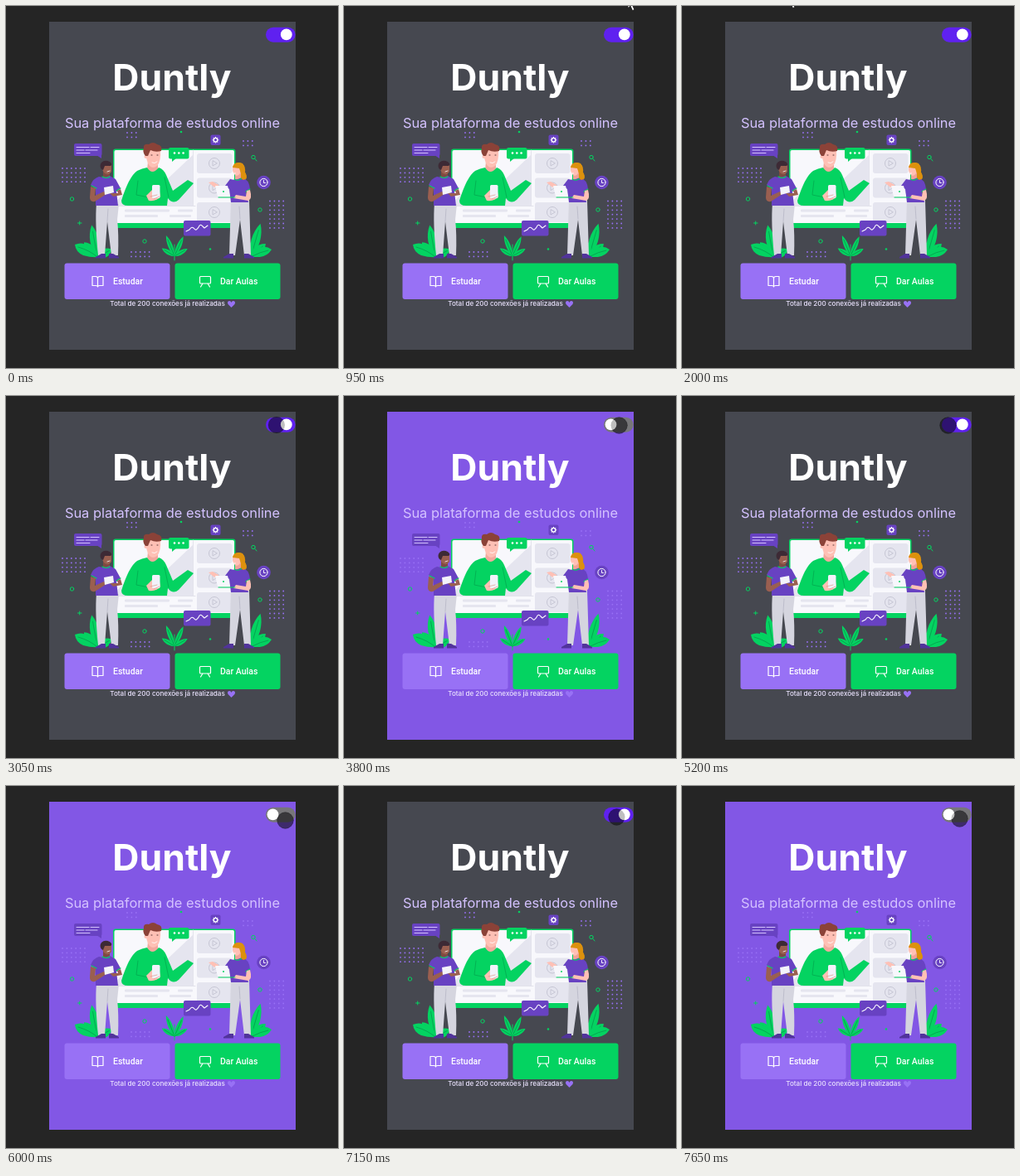
Write an HTML page with a canvas that moves like this. It is 400 px wide and 437 px high and loops after 8000 ms.

```html
<!DOCTYPE html>
<html lang="pt-BR">
<head>
<meta charset="utf-8">
<title>Plataforma de estudos</title>
<style>
html, body { margin: 0; width: 400px; height: 437px; overflow: hidden; background: #252525; }
canvas { display: block; }
</style>
</head>
<body>
<canvas id="stage" width="400" height="437"></canvas>
<script>
const ctx = document.getElementById('stage').getContext('2d');
const LOOP = 8000, STEP = 50;
const GREEN = '#04d361', VIOLET = '#8257e5', LILAC = '#9871f5', DEEP = '#6842c2';
const PALE = '#d4c2ff', GRAY = '#e5e5ef', SKIN = '#ffc0b5', BROWN = '#9a5f50', TROUSER = '#d5d5df';

const fill = (d, color) => { ctx.fillStyle = color; ctx.fill(new Path2D(d)); };

function stroke(d, color, width = 1) {
  ctx.strokeStyle = color;
  ctx.lineWidth = width;
  ctx.lineCap = ctx.lineJoin = 'round';
  ctx.stroke(new Path2D(d));
}

function box(x, y, w, h, r, color) {
  ctx.fillStyle = color;
  ctx.beginPath();
  ctx.roundRect(x, y, w, h, r);
  ctx.fill();
}

function disc(x, y, r, color) {
  ctx.fillStyle = color;
  ctx.beginPath();
  ctx.arc(x, y, r, 0, Math.PI * 2);
  ctx.fill();
}

function ring(x, y, r, color, width = 1) {
  ctx.strokeStyle = color;
  ctx.lineWidth = width;
  ctx.beginPath();
  ctx.arc(x, y, r, 0, Math.PI * 2);
  ctx.stroke();
}

function dots(x, y, cols, rows, pitch = 5.4) {
  for (let i = 0; i < cols * rows; i++)
    disc(x + i % cols * pitch, y + Math.floor(i / cols) * pitch, 0.9, LILAC);
}

function label(text, x, y, font, color, align = 'left') {
  ctx.font = font;
  ctx.fillStyle = color;
  ctx.textAlign = align;
  ctx.fillText(text, x, y);
}

// One pointed leaf with a midrib, growing from (x, y).
function leaf(x, y, angle, length, width) {
  ctx.save();
  ctx.translate(x, y);
  ctx.rotate(angle * Math.PI / 180);
  fill(`M0 0C${-width} ${-length * .3} ${-width} ${-length * .7} 0 ${-length}C${width} ${-length * .7} ${width} ${-length * .3} 0 0Z`, GREEN);
  stroke(`M0 0V${-length * .8}`, '#078a48', 0.6);
  ctx.restore();
}

function plants() {
  for (const [a, l] of [[-10, 39], [-42, 24], [62, 20]]) leaf(110, 303, a, l, 7);
  for (const [a, l] of [[16, 42], [48, 24], [-14, 22]]) leaf(295, 303, a, l, 7);
  fill('M112 303Q103 304 93 301Q84 297 83 288Q92 284 100 290Q109 294 112 303Z', GREEN);
  fill('M293 303Q296 293 304 293Q312 288 320 294Q315 302 306 303Z', GREEN);
  stroke('M87 291Q101 295 110 303M297 302Q306 297 316 295', '#078a48', 0.6);
  for (const [a, l] of [[-58, 18], [-22, 27], [24, 26], [60, 18]]) leaf(203, 302, a, l, 3.7);
  stroke('M203 288V307', GREEN);
}

function ornaments() {
  dots(68, 196, 6, 4);
  dots(318, 235.5, 4, 7);
  dots(146, 153, 3, 2);
  dots(286, 163, 3, 2);
  dots(151, 297, 5, 2);
  for (const [x, y] of [[79.5, 233], [167, 284], [306, 246], [298, 182.5]]) ring(x, y, 2.2, GREEN);
  stroke('M300 184.5L302 187M86.5 262H91M88.7 260V264', GREEN);
  disc(211, 152, 1.3, GREEN);
  disc(246, 293.5, 1.3, GREEN);
}

function playCard(y) {
  box(230, y, 42.5, 24, 3, GRAY);
  ring(251, y + 12, 6.5, '#c6c6d4');
  stroke(`M249 ${y + 9}V${y + 15}L254 ${y + 12}Z`, '#c6c6d4');
}

function presenter() {
  fill('M171 188H183V198L177 204L170 198Z', '#f2a99e');
  fill('M139 235Q148 206 158 199Q164 196 170 195Q176 205 184 195Q190 197 193 204L201 223L219 210L226 214L208 234Q201 240 195 232L194 241H147Q139 241 139 235Z', GREEN);
  fill('M169 174Q168 187 173 193Q177 197 182 193Q187 187 186 174Z', SKIN);
  disc(168.5, 182, 2, SKIN);
  fill('M168 181Q164 176 166 172Q165 166 172 167Q177 163 182 167Q189 168 187 175Q180 177 174 174L171 181Z', '#8b4238');
  stroke('M176 189Q179 191 182 188', '#fff', 0.8);
  stroke('M175 180H176M182 180H183', '#472629', 0.9);
  stroke('M159 211L157 228L172 231M191 207L196 231', '#03aa50', 0.8);
  fill('M169 229L176 222L184 218L186 230Q182 236 172 235Z', SKIN);
  box(176, 216, 9.5, 16, 1.5, '#f2f2fa');
  stroke('M174 230L182 228M178 233L185 230', '#df978c', 0.7);
}

function monitor() {
  box(129, 172.5, 147.5, 95.5, 3, GREEN);
  box(130.5, 174, 144.5, 88, 2, '#f8f8fc');
  fill('M190 213L225 180V241H190ZM132 241V236L150 219V241Z', GRAY);
  stroke('M225.5 174V241M131 241.5H228', '#dddde8', 0.8);
  for (const y of [178, 207.5, 237]) playCard(y);
  box(143, 245.5, 54, 3, 1, GRAY);
  box(143, 252, 40, 3, 1, GRAY);
  box(207, 245.5, 18, 3, 1, GRAY);
  box(197, 252, 26, 3, 1, GRAY);
  presenter();
}

function badges() {
  box(82, 166, 33.5, 15, 2, DEEP);
  fill('M109 180H115V184Z', DEEP);
  stroke('M85 170.5H100M102 170.5H112M85 174H94M96 174H110M85 177.5H101', PALE, 1.1);

  box(196, 171, 24.5, 13.5, 2, GREEN);
  fill('M200 183H206L200 188Z', GREEN);
  for (const x of [203, 208.3, 213.6]) disc(x, 177.5, 1.3, '#fff');

  box(246.5, 155.5, 12, 12.5, 2, DEEP);
  ring(252.5, 161.7, 2.3, '#fff', 1.4);
  for (let i = 0; i < 8; i++)
    disc(252.5 + 3.3 * Math.cos(i * Math.PI / 4), 161.7 + 3.3 * Math.sin(i * Math.PI / 4), 0.6, '#fff');

  disc(310.5, 213, 8.3, DEEP);
  ring(310.5, 213, 4.6, '#fff');
  stroke('M310.5 210.5V213.5H312.5', '#fff', 0.9);

  box(214, 259, 32.5, 18.5, 2, DEEP);
  stroke('M217 272L221 270Q224 265 227 269Q229 272 232 267Q234 262 237 266L239 268L243 265', '#fff', 1.1);
}

function shoe(x, y, side) {
  fill(`M${x} ${y - 3}H${x + side * 5}L${x + side * 12} ${y + 1}V${y + 2.5}H${x}Z`, '#51339b');
}

function student() {
  fill('M109 238Q107 262 111 301H119L122 260L127 301H135Q136 275 134 258L136 239Z', TROUSER);
  stroke('M123 245L122 260', '#b6b6c6', 0.8);
  shoe(120, 302, -1);
  shoe(124, 302, 1);
  fill('M117 198H125V208H117Z', '#7f4a40');
  fill('M112 206Q119 208 125 205L132 209L138 220L133 224L135 241H108V221L102 216Q105 208 112 206Z', DEEP);
  stroke('M116 206Q121 209 125 206M103 217L109 220M133 223L138 220', GREEN, 1.2);
  fill('M102 218L108 220L107 229L118 224L121 227L107 236Q101 237 101 231Z', BROWN);
  fill('M134 223L138 221L140 228L129 230L125 226L135 226Z', BROWN);
  fill('M116 190Q115 199 119 202Q124 205 127 200L127 190Z', BROWN);
  fill('M115 197Q112 193 115 189Q119 185 125 188Q129 191 126 193L119 193L117 198Z', '#3d2a35');
  stroke('M122 200L125 199', '#fff', 0.8);
  fill('M118 219L129 217L130 225L119 228Z', '#f3f3fa');
}

function teacher() {
  fill('M271 233L269 301H276L282 258L287 301H295L293 234Z', TROUSER);
  stroke('M281 242L282 257', '#b6b6c6', 0.8);
  shoe(274, 302, -1);
  shoe(287, 302, 1);
  fill('M275 192Q279 187 285 190Q289 195 288 201Q293 208 286 212Q278 210 277 202Z', '#dc910d');
  fill('M276 201H283V210H276Z', '#efa398');
  fill('M270 209Q277 211 284 207Q293 209 294 221L289 224L292 237H271L269 221L264 217Z', DEEP);
  stroke('M275 209Q280 212 284 208M289 224L294 221', GREEN, 1.1);
  fill('M290 223L294 222Q297 233 292 235L274 232L277 228L289 230Z', SKIN);
  fill('M256 216L249 212L244 213L250 218L257 221Z', SKIN);
  fill('M273 193Q272 203 278 205Q283 204 284 195Z', SKIN);
  fill('M273 195Q274 188 281 189Q289 191 287 199Q292 206 287 210Q282 210 283 202L281 196Z', '#dc910d');
  stroke('M274.5 202H276.5', '#fff', 0.8);
  fill('M252 217H267L270 230H255Z', '#f7f7fc');
  stroke('M256 231H276', GREEN, 1);
  disc(262, 224, 1, GREEN);
}

function buttons() {
  box(70.5, 310.5, 127, 43.5, 3, LILAC);
  box(203.5, 310.5, 127, 43.5, 3, GREEN);
  stroke('M104 326.5H108Q110.5 326.5 110.5 329V339Q110.5 337.5 108 337.5H104ZM117 326.5H113Q110.5 326.5 110.5 329V339Q110.5 337.5 113 337.5H117Z', '#fff', 1.2);
  stroke('M234.5 326.5H245.5Q246.5 326.5 246.5 327.5V334Q246.5 335 245.5 335H234.5Q233.5 335 233.5 334V327.5Q233.5 326.5 234.5 326.5ZM237 335L234.5 339M243 335L245.5 339', '#fff', 1.2);
  const font = '500 10.5px Roboto, sans-serif';
  label('Estudar', 129, 336, font, '#fff');
  label('Dar Aulas', 258, 336, font, '#fff');
}

const ease = p => p * p * (3 - 2 * p);
const progress = (t, from, to) => Math.min(1, Math.max(0, (t - from) / (to - from)));

// Moments at which the theme flips; it begins dark with the switch on.
const TOGGLES = [3450, 4550, 5750, 6600, 7450];

function toggle(t) {
  const past = TOGGLES.filter(at => t >= at);
  const on = past.length % 2 === 0;
  const p = past.length ? ease(progress(t, past.at(-1) - STEP, past.at(-1) + 150)) : 1;
  return { on, thumb: on ? 321.5 + 16.3 * p : 337.8 - 16.3 * p };
}

// [time, x, y] of the pointer tip.
const TRAIL = [
  [250, 26, -20], [400, 150, 4], [500, 270, 8], [600, 390, -16],
  [900, 384, -18], [1000, 300, -1], [1100, 212, -17],
  [1550, 212, -17], [1650, 185, -11], [1750, 142, -17],
  [1950, 138, -17], [2000, 128, -12.5], [2400, 240, 20], [2800, 322, 34],
  [2950, 322, 34], [3050, 326, 35], [3550, 326, 35], [3800, 331.5, 35.5],
  [4350, 331.5, 35.5], [4850, 334, 36], [5000, 334, 36], [5200, 320.5, 35.5],
  [5700, 320.5, 35.5], [6000, 336.5, 41.5], [6400, 336.5, 41.5], [6600, 325, 36],
  [7000, 332, 36], [7100, 332, 36], [7150, 328.5, 37.5], [7350, 328.5, 37.5], [7650, 334.5, 39.5]
];

function pointer(t) {
  const i = TRAIL.findIndex(k => k[0] > t);
  if (i === 0) return { x: -40, y: -40 };
  if (i < 0) return { x: TRAIL.at(-1)[1], y: TRAIL.at(-1)[2] };
  const [t0, x0, y0] = TRAIL[i - 1], [t1, x1, y1] = TRAIL[i];
  const p = progress(t, t0, t1);
  return { x: x0 + (x1 - x0) * p, y: y0 + (y1 - y0) * p };
}

function drawSwitch({ on, thumb }, { x, y }, touching) {
  box(313, 25.7, 35.7, 18, 9, on ? '#5f21f0' : '#777679');
  if (touching) {
    disc(x, y, 10, 'rgba(12,12,18,.4)');
    ring(x, y, 9.8, 'rgba(25,25,30,.25)', 0.8);
  }
  disc(thumb, 34.4, 6.9, '#fff');
  if (touching) disc(x, y, 10, 'rgba(0,0,0,.25)');
}

function arrow({ x, y }) {
  ctx.save();
  ctx.translate(x, y);
  const d = 'M0 0V12L3 9.5L5.5 15L8 14L5.5 8.5H9.5Z';
  fill(d, '#fff');
  stroke(d, '#111', 0.8);
  ctx.restore();
}

function draw(t) {
  const state = toggle(t), at = pointer(t);
  const touching = at.x > 52 && at.x < 349 && at.y > 19;
  ctx.fillStyle = '#252525';
  ctx.fillRect(0, 0, 400, 437);
  ctx.fillStyle = state.on ? '#464850' : VIOLET;
  ctx.fillRect(52, 19, 297, 396);

  label('Duntly', 200, 102, '700 44.5px Inter, sans-serif', '#fff', 'center');
  label('Sua plataforma de estudos online', 200.5, 146.5, '400 16.4px Inter, sans-serif', PALE, 'center');
  ornaments();
  plants();
  monitor();
  student();
  teacher();
  badges();
  buttons();
  label('Total de 200 conexões já realizadas', 194.5, 362, '500 8.1px Inter, sans-serif', '#ece4ff', 'center');
  fill('M271.5 364L267.5 360Q266 356.5 269 356Q271 356 271.5 358Q272 356 274 356Q277 356.5 275.5 360Z', LILAC);

  drawSwitch(state, at, touching);
  if (!touching) arrow(at);
}

function frame(now) {
  draw(Math.floor(now % LOOP / STEP) * STEP);
  requestAnimationFrame(frame);
}
requestAnimationFrame(frame);
</script>
</body>
</html>
```
